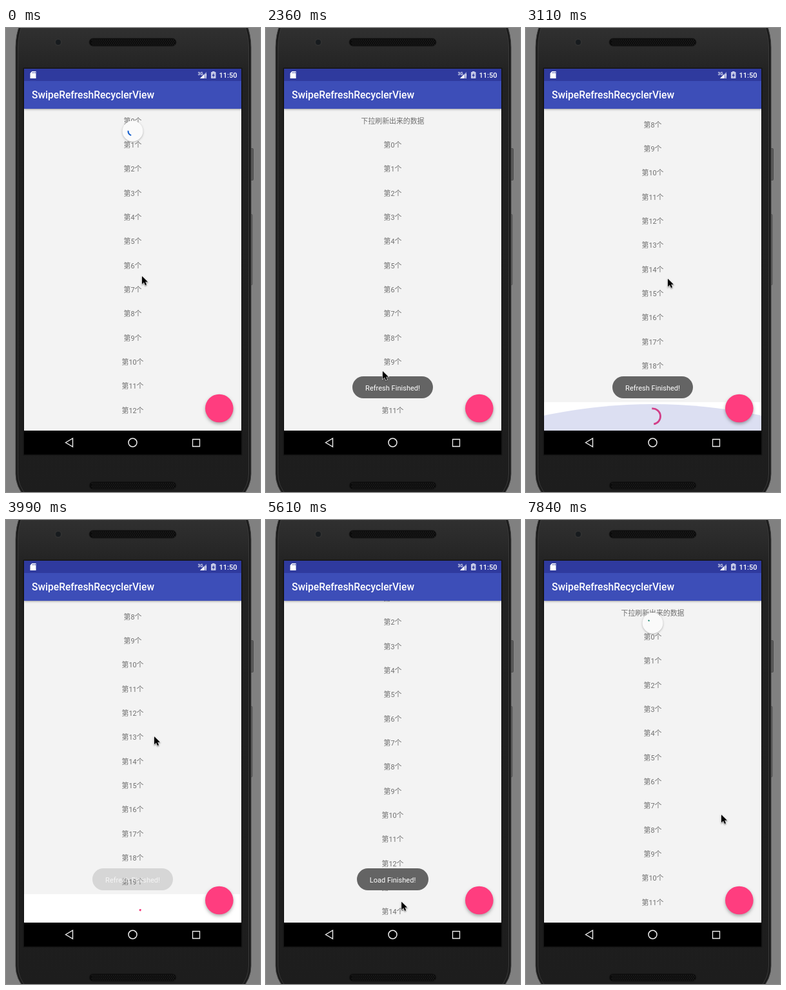
An HTML page with a canvas for the animation above (7.99 s loop, 394 by 718 pixels).

```html
<!DOCTYPE html>
<html lang="zh">
<head>
<meta charset="utf-8">
<style>
  html, body { margin: 0; width: 100%; height: 100%; overflow: hidden; background: #808080; }
  canvas { display: block; }
</style>
</head>
<body>
<canvas id="stage" width="394" height="718"></canvas>
<script>
const ctx = document.getElementById('stage').getContext('2d');
const LOOP = 7990, STEP = LOOP / 54, CYCLE = 1332, TAU = Math.PI * 2;
const FONT = 'Roboto, "Noto Sans CJK SC", "Noto Sans CJK", sans-serif';
const CENTER = 196.5, LEFT = 28, WIDTH = 337;
const LIST = { top: 125, bottom: 623, row: 37.33, scroll: 330 };
const REFRESHED = 1400, LOADED = 4950;
const PRIMARY = '#3d4eb8', PRIMARY_DARK = '#2f3a9e';

// Where the pointer rests or turns.
const STOPS = [
  { t: 1260, x: 210, y: 383 }, { t: 2360, x: 180, y: 530 }, { t: 2520, x: 180, y: 530 },
  { t: 3110, x: 219, y: 387 }, { t: 3990, x: 229, y: 334 }, { t: 5030, x: 227, y: 282 },
  { t: 5620, x: 206, y: 645 }, { t: 6650, x: 192, y: 281 }, { t: 7840, x: 302, y: 455 }
];

const clamp = v => Math.max(0, Math.min(1, v));
const ramp = (t, from, to) => clamp((t - from) / (to - from));
const smooth = k => k * k * (3 - 2 * k);
const pulse = (t, start, end) => ramp(t, start, start + 400) * (1 - ramp(t, end - 370, end));
const radians = degrees => degrees / 360 * TAU;
const mix = (a, b, k) => `rgb(${a.map((v, i) => Math.round(v + (b[i] - v) * k)).join()})`;

// Material "fast out, slow in": cubic-bezier(.4, 0, .2, 1)
function ease(x) {
  let low = 0, high = 1, s = 0.5;
  for (let i = 0; i < 16; i++) {
    s = (low + high) / 2;
    const at = 1.2 * s * (1 - s) ** 2 + 0.6 * s * s * (1 - s) + s ** 3;
    if (at < x) low = s; else high = s;
  }
  return 3 * s * s * (1 - s) + s ** 3;
}

function rect(x, y, w, h, color) {
  ctx.fillStyle = color;
  ctx.fillRect(x, y, w, h);
}

function round(x, y, w, h, r, fill, stroke) {
  ctx.beginPath();
  ctx.roundRect(x, y, w, h, r);
  ctx.fillStyle = fill;
  ctx.fill();
  if (stroke) { ctx.strokeStyle = stroke; ctx.lineWidth = 1; ctx.stroke(); }
}

function disc(x, y, r, fill) {
  ctx.beginPath();
  ctx.arc(x, y, r, 0, TAU);
  ctx.fillStyle = fill;
  ctx.fill();
}

function arc(x, y, r, width, color, start, turns) {
  ctx.beginPath();
  ctx.arc(x, y, r, start, start + Math.max(turns, 0.012) * TAU);
  ctx.strokeStyle = color;
  ctx.lineWidth = width;
  ctx.stroke();
}

function shape(path, fill, stroke, width) {
  const outline = new Path2D(path);
  if (stroke) { ctx.strokeStyle = stroke; ctx.lineWidth = width; ctx.stroke(outline); }
  if (fill) { ctx.fillStyle = fill; ctx.fill(outline); }
}

function text(string, x, y, size, color, align = 'center', weight = 400) {
  ctx.font = `${weight} ${size}px ${FONT}`;
  ctx.textAlign = align;
  ctx.fillStyle = color;
  ctx.fillText(string, x, y);
}

function withShadow(alpha, blur, dy, draw) {
  ctx.save();
  ctx.shadowColor = `rgba(0,0,0,${alpha})`;
  ctx.shadowBlur = blur;
  ctx.shadowOffsetY = dy;
  draw();
  ctx.restore();
}

function spinner(x, y, r, width, color, elapsed, origin) {
  const cycles = elapsed / CYCLE, count = Math.floor(cycles), p = cycles - count;
  const tail = 0.8 * ease(clamp(p * 2 - 1)), head = 0.8 * ease(clamp(p * 2));
  arc(x, y, r, width, color, origin + (0.78 * cycles + 0.8 * count + tail) * TAU, head - tail);
}

function speaker(y) {
  round(129, y, 135, 12, 6, '#0b0b0b', '#191919');
  for (let row = 0; row < 4; row++)
    for (let x = 133 + row % 2 * 1.5; x < 261; x += 3) rect(x, y + 2 + row * 2.4, 1.2, 1.2, '#2d2d2d');
}

function phone() {
  rect(0, 0, 394, 718, '#808080');
  round(379.5, 186.5, 4, 49, 1, '#5c5c5c', '#484848');
  round(379.5, 288.5, 2.5, 109, 1, '#686868', '#505050');
  const body = ctx.createLinearGradient(0, 0, 0, 718);
  body.addColorStop(0, '#303030');
  body.addColorStop(0.1, '#222');
  body.addColorStop(1, '#1d1d1d');
  round(15, -70, 365, 810, [100, 100, 50, 50], '#1a1a1a', '#404040');
  round(18.5, -67, 358, 804, [97, 97, 47, 47], body, '#3a3a3a');
  round(26.5, 61.5, 340, 600, 1, '#151515');
  disc(81, 22, 6, '#303030');
  disc(81, 22, 4, '#171b1e');
  speaker(16);
  speaker(702);
}

function statusBar() {
  rect(LEFT, 63, WIDTH, 19, PRIMARY_DARK);
  shape('M40.5 67h6v11h-9v-8z', '#fff');
  for (let x = 41; x < 46; x += 2) rect(x, 68, 0.8, 2.2, PRIMARY_DARK);
  text('3G', 297.5, 72.5, 6.5, '#fff', 'left', 500);
  shape('M311 68v10h-10z', '#9aa0d2');
  shape('M307.5 71.5v6.5h-6.5z', '#fff');
  text('!', 309, 78, 9, '#fff', 'left', 500);
  round(318, 68, 7.5, 10, 0.8, '#c5c9e7');
  rect(320, 67, 3.5, 1.5, '#c5c9e7');
  shape('M322.5 69.5l-3 4.5h2l-.5 3 3-4.5h-1.8z', PRIMARY_DARK);
  text('11:50', 358.5, 76.5, 11, '#fff', 'right', 500);
}

function bars() {
  withShadow(0.35, 3, 1, () => rect(LEFT, 82, WIDTH, 43, PRIMARY));
  statusBar();
  text('SwipeRefreshRecyclerView', 40, 109, 15.6, '#fff', 'left', 500);
  rect(LEFT, LIST.bottom, WIDTH, 37, '#000');
  shape('M92.5 641.5l11-6.5v13z', null, '#eee', 1.4);
  arc(CENTER, 641.5, 6.5, 1.5, '#eee', 0, 1);
  shape('M289.5 636.5h11v11h-11z', null, '#eee', 1.3);
}

function list(t) {
  const rows = Array.from({ length: 20 }, (_, i) => `第${i}个`);
  if (t >= REFRESHED) rows.unshift('下拉刷新出来的数据');
  if (t >= LOADED) rows.push('加载更多的数据');
  const top = LIST.top - LIST.scroll * (smooth(ramp(t, 2520, 2960)) - smooth(ramp(t, 5180, 5640)));
  rect(LEFT, LIST.top, WIDTH, LIST.bottom - LIST.top, '#f3f3f3');
  rows.forEach((row, i) => text(row, CENTER, top + i * LIST.row + 22.7, 10.9, '#6f6f6f'));

  if (t < LOADED) {
    const y = top + rows.length * LIST.row;
    rect(LEFT, y, WIDTH, 44, '#fff');
    if (t > 2840) spinner(CENTER, y + 22, 12, 2.8, '#f33b7d', t - 2840, radians(-152));
  }
  const glow = ramp(t, 2800, 3000) * (1 - ramp(t, 3110, 3560));
  if (glow > 0) {
    const height = 41 * (0.4 + 0.6 * glow);
    disc(CENTER, LIST.bottom - height + 810, 810, `rgba(63,81,181,${0.18 * glow})`);
  }
}

function refreshCircle(t) {
  const first = t < LOOP / 2;
  const scale = first ? 1 - ramp(t, 1190, 1480) : ramp(t, 6900, 7100);
  if (!scale) return;
  const blue = [20, 94, 205], green = [8, 125, 98];
  ctx.save();
  ctx.translate(CENTER, 159.5);
  ctx.scale(scale, scale);
  withShadow(0.28, 3, 1, () => disc(0, 0, 16, '#fafafa'));
  if (first) {
    spinner(0, 0, 7, 2, mix(blue, green, ramp(t, 826, 1159)), t + 173, radians(73));
  } else {
    const left = 1 - ease(ramp(t, 7180, 7840));
    const head = radians(205 - 110 * left);
    arc(0, 0, 7, 2.2, mix(green, blue, left), head - 0.8 * left * TAU, 0.8 * left + 0.04);
  }
  ctx.restore();
}

function toast(message, width, alpha) {
  if (!alpha) return;
  round(CENTER - width / 2, 539, width, 34, 17, `rgba(100,100,100,${alpha})`);
  text(message, CENTER, 560.5, 11.06, mix([243, 243, 243], [255, 255, 255], alpha));
}

function pointer(t) {
  const next = STOPS.find(stop => stop.t >= t) || STOPS[STOPS.length - 1];
  const last = STOPS[Math.max(0, STOPS.indexOf(next) - 1)];
  const k = next === last ? 1 : smooth(ramp(t, last.t, next.t));
  const arrow = 'M0 0v14.5l3.5-3.2 2.4 5.3 2.4-1.1-2.3-5.1 4.5-.2z';
  ctx.save();
  ctx.translate(last.x + (next.x - last.x) * k + 1, last.y + (next.y - last.y) * k + 1);
  ctx.scale(0.85, 0.85);
  withShadow(0.35, 2, 1, () => shape(arrow, '#fff', '#fff', 1.6));
  shape(arrow, '#000');
  ctx.restore();
}

function render(t) {
  phone();
  ctx.save();
  ctx.beginPath();
  ctx.rect(LEFT, LIST.top, WIDTH, LIST.bottom - LIST.top);
  ctx.clip();
  list(t);
  refreshCircle(t);
  withShadow(0.32, 5, 2.5, () => disc(330.8, 588.5, 21.8, '#ff3d7f'));
  ctx.restore();
  bars();
  toast('Refresh Finished!', 125, pulse(t, 1480, 4070));
  toast('Load Finished!', 111, pulse(t, 4890, 7500));
  pointer(t);
}

// The picture advances in even steps, like a screen recording.
function frame() {
  const now = performance.now() % LOOP;
  render(Math.min(53, Math.floor((now + 8) / STEP)) * STEP);
  requestAnimationFrame(frame);
}
frame();
</script>
</body>
</html>
```
